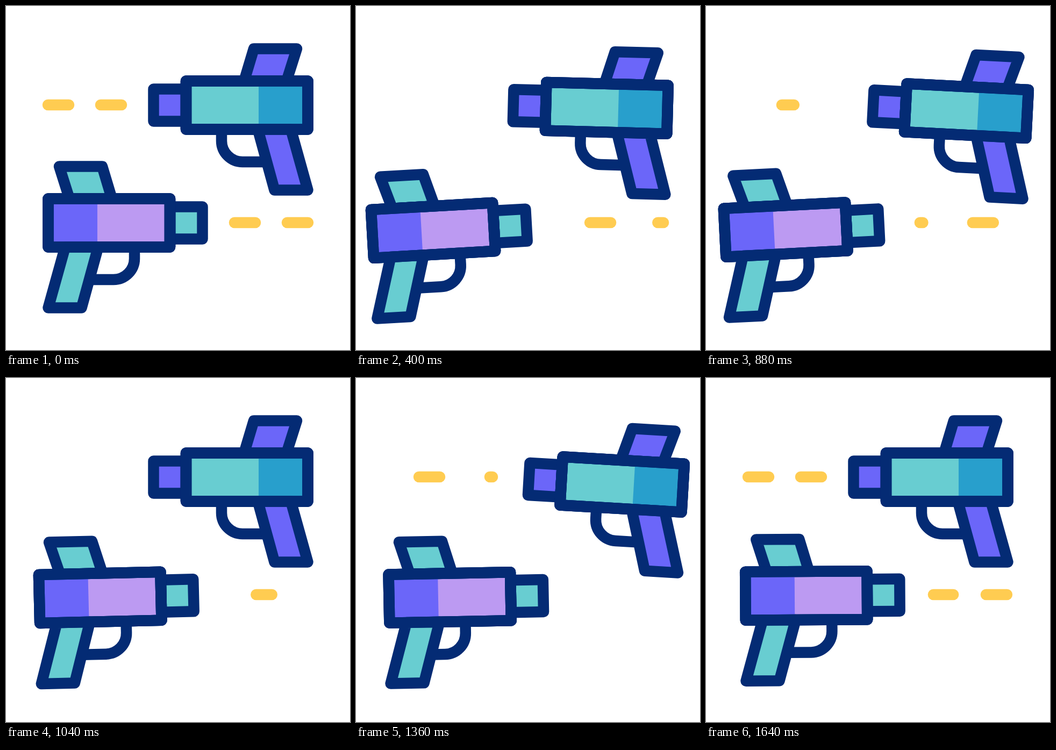
Recreate the animation shown at these times as an HTML page with a canvas. Size 640x640 px, loop 1680 ms.

```html
<!DOCTYPE html>
<html>
<head>
<meta charset="utf-8">
<style>
html, body { margin: 0; height: 100%; overflow: hidden; background: #fff; }
canvas { display: block; }
</style>
</head>
<body>
<canvas id="stage" width="640" height="640"></canvas>
<script>
const ctx = document.getElementById('stage').getContext('2d');
const LOOP = 1680, STEP = 40, FIRST_SHOT = 120;
const NAVY = '#042b74', YELLOW = '#ffcc51', PURPLE = '#6b66f9', TEAL = '#68cdd1';

// One shot, sampled every 40 ms
const KICK = [2.4, 6.5, 14, 40.5, 46.5, 45.4, 34.9, 17.4, 9, 5.5, 0, 0, 0];
const TILT = [.2, .5, .95, 2.75, 3.2, 3.34, 2.92, 1.5, .8, .42, 0, 0, 0];
const TRIGGER = [4, 13, 20, 8.5, 0, 2, 0, 0, 0, 0, 0, 0, 0];

// Bullet passes: speed in px/ms, time at the middle, travel limits, growth rate
const PASSES = [
  { speed: .36, mid: 200, min: 0, max: 999, grow: 1 },
  { speed: .362, mid: 783, min: -999, max: 999, grow: 1.23 },
  { speed: .342, mid: 1474, min: -999, max: 0, grow: .87 }
];

const SIGHT = new Path2D('M443 139.5L461 79.5H541L522 139.5Z');
const GRIP = new Path2D('M468.5 229.5L499.5 342.5H561.5L530 229.5Z');
const MUZZLE = new Path2D('M274.5 154.5H335V214.5H274.5Z');
const BODY = new Path2D('M335 139.5H561.5V229.5H335Z');
const GUARD = new Path2D('M401 230V251A39 39 0 0 0 440 290H484');

// Catmull-Rom through a repeating list of keys
function sample(keys, time) {
  if (time < FIRST_SHOT - STEP) return 0;
  const pos = (time - FIRST_SHOT) / STEP, i = Math.floor(pos), f = pos - i;
  const [a, b, c, d] = [-1, 0, 1, 2].map(n => keys[(i + n + 2 * keys.length) % keys.length]);
  return b + f / 2 * (c - a + f * (2 * a - 5 * b + 4 * c - d + f * (3 * (b - c) + d - a)));
}

function shape(path, fill) {
  ctx.fillStyle = fill;
  ctx.fill(path);
  ctx.stroke(path);
}

function dash(left, right) {
  if (right <= left) return;
  ctx.beginPath();
  ctx.moveTo(left, 184);
  ctx.lineTo(right, 184);
  ctx.stroke();
}

function drawBullets(time) {
  ctx.strokeStyle = YELLOW;
  for (const { speed, mid, min, max, grow } of PASSES) {
    const s = Math.min(max, Math.max(min, speed * (time - mid)));
    const pos = v => Math.max(0, v);
    dash(78 - s + pos(1.5 * (-s - 40)), 117 - s - pos(2.8 * s));
    dash(176 - s + pos(-grow * s), 215 - s - pos(1.5 * (s - 24.4)));
  }
}

function drawGun(time, accent, front, rear) {
  const kick = sample(KICK, time);
  ctx.save();
  ctx.translate(418 + kick, 211 + .26 * kick);
  ctx.rotate(sample(TILT, time) * Math.PI / 180);
  ctx.translate(-418, -211);
  ctx.strokeStyle = NAVY;
  shape(SIGHT, accent);
  shape(MUZZLE, accent);
  shape(BODY, front);
  ctx.fillStyle = rear;
  ctx.fillRect(470, 149, 82, 71);
  ctx.stroke(BODY);
  ctx.save();
  ctx.translate(sample(TRIGGER, time), 0);
  ctx.stroke(GUARD);
  ctx.restore();
  shape(GRIP, accent);
  ctx.stroke(BODY);
  ctx.restore();
}

function draw(now) {
  const time = Math.floor(now % LOOP / STEP) * STEP;
  ctx.setTransform(1, 0, 0, 1, 0, 0);
  ctx.fillStyle = '#fff';
  ctx.fillRect(0, 0, 640, 640);
  ctx.lineWidth = 20.5;
  ctx.lineCap = ctx.lineJoin = 'round';
  drawBullets(time);
  drawGun(time, PURPLE, TEAL, '#289fcc');
  ctx.setTransform(-1, 0, 0, 1, 640, 219);
  drawBullets(time - 172);
  drawGun(time - 115, TEAL, '#bc9af2', PURPLE);
}

const start = performance.now();
function tick() {
  draw(performance.now() - start);
  requestAnimationFrame(tick);
}
tick();
</script>
</body>
</html>
```
